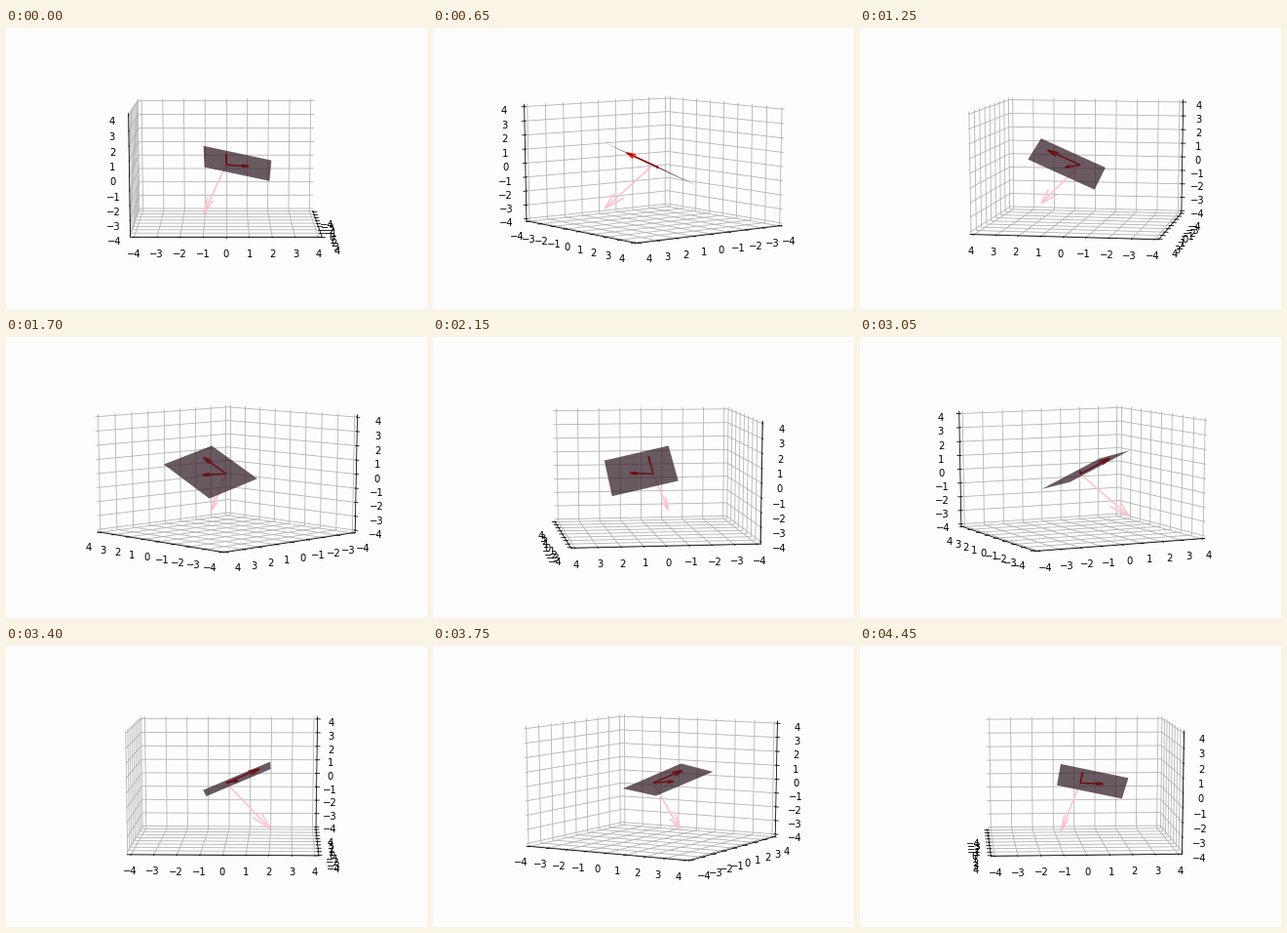
Write a matplotlib script that moves like this. It is 432 by 288 pixels and loops after 4500 ms.

```python
import math

import matplotlib.pyplot as plt
import numpy as np
from matplotlib.animation import FuncAnimation
from mpl_toolkits.mplot3d.art3d import Poly3DCollection

FRAMES, INTERVAL = 90, 50
ELEVATION = 10
LIMIT = 4
BACKGROUND = "#fdfdfd"

A = np.array([1.5, 0, 1])
B = np.array([0.5, 1, 0])
NORMAL = 2 * np.cross(B, A)

plt.rcParams.update({"font.family": "DejaVu Sans", "font.size": 10})
fig = plt.figure(figsize=(6, 4), dpi=72, facecolor=BACKGROUND)
ax = fig.add_axes([0.125, 0.125, 0.775, 0.755], projection="3d",
                  computed_zorder=False, facecolor=BACKGROUND)

# Let the cube stretch with the wide axes instead of staying square.
ax.apply_aspect = lambda position=None: None
ax.set_box_aspect((1, 1, 1), zoom=math.sqrt(3) / 1.8294640721620434)

edge = LIMIT * 25 / 24
ax.set(xlim=(-edge, edge), ylim=(-edge, edge), zlim=(-edge, edge))
for axis in (ax.xaxis, ax.yaxis, ax.zaxis):
    axis.set_ticks(range(-LIMIT, LIMIT + 1))
    axis.set_pane_color((1, 1, 1, 0))


def arrow(vector, color, zorder):
    ax.quiver(0, 0, 0, *vector, color=color, linewidth=1.5, zorder=zorder)


def plane_point(x, y):
    return x, y, -(NORMAL[0] * x + NORMAL[1] * y) / NORMAL[2]


arrow(NORMAL, "pink", 2)
arrow(A, "red", 3)
arrow(B, "red", 3)

corners = [plane_point(x, y) for x, y in ((-1, -1), (2, -1), (2, 2), (-1, 2))]
ax.add_collection3d(Poly3DCollection(
    [corners], facecolor=(0.17, 0.08, 0.12, 0.7), linewidth=0, zorder=4))


def draw(frame):
    ax.view_init(elev=ELEVATION, azim=frame * 360 / FRAMES)
    return ()


anim = FuncAnimation(fig, draw, frames=FRAMES, interval=INTERVAL,
                     repeat=True, repeat_delay=0, blit=False)
plt.show()
```
